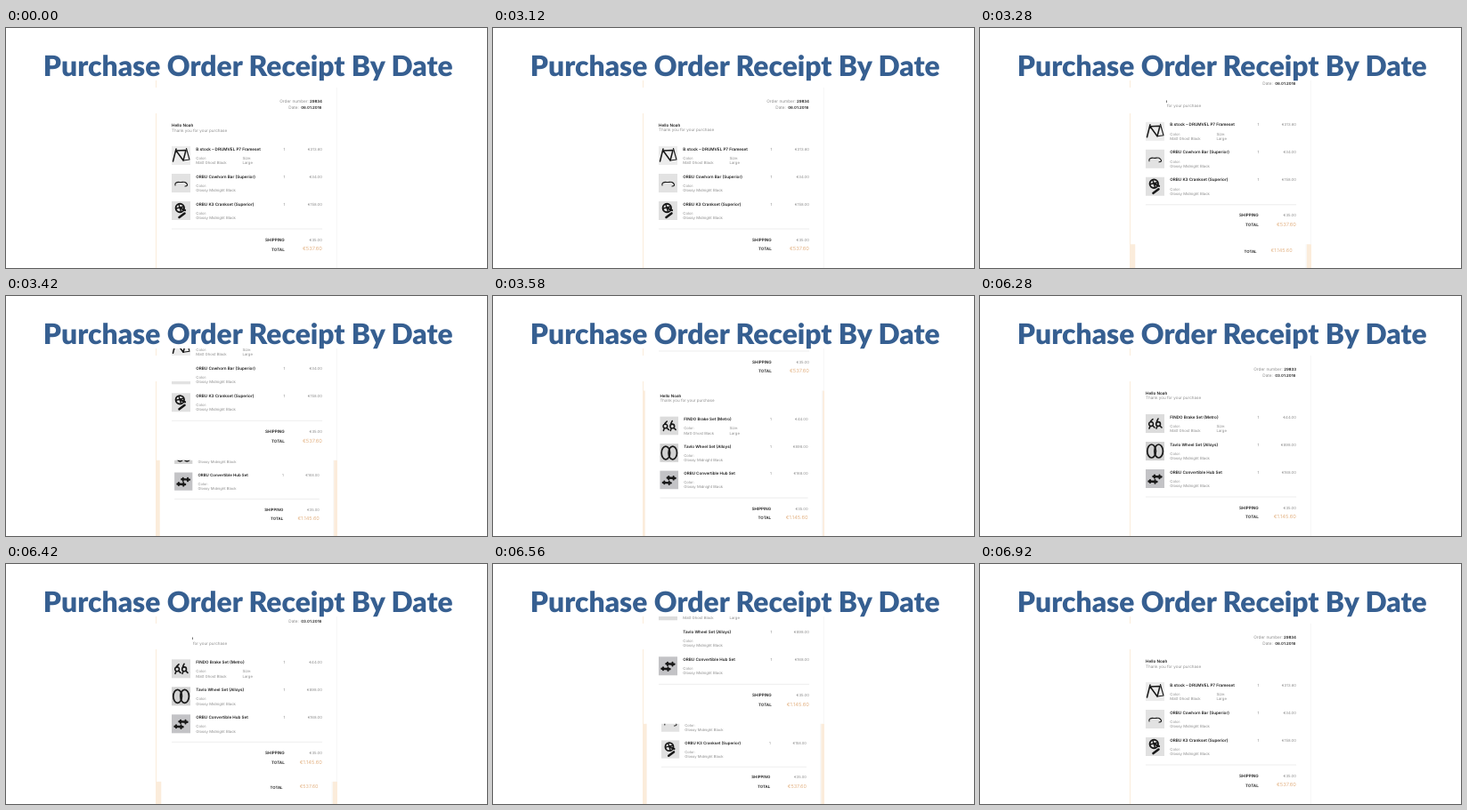
Animation, 540 px wide and 270 px high, one loop 7480 ms. Source, as an HTML page:

```html
<!DOCTYPE html>
<html lang="en">
<head>
<meta charset="utf-8">
<title>Purchase Order Receipt By Date</title>
<style>
  html, body { margin: 0; width: 100%; height: 100%; overflow: hidden; background: #fff; }
  svg { display: block; width: 540px; height: 270px; text-rendering: geometricPrecision; }
  .title { font: 900 31.8px Lato, sans-serif; fill: #365f91; text-anchor: middle; }
  .card text { font: 400 4.28px Inter, sans-serif; fill: #8c8c8c; }
  .card .bold { font-weight: 600; font-size: 4.6px; fill: #1c1c1c; }
  .card .digits { font-size: 4.35px; }
  .card .label { font-size: 4.75px; }
  .card .intro { font-size: 4.57px; }
  .card .sum { font-size: 5.75px; fill: #e3b385; }
  .end { text-anchor: end; }
  .line { fill: none; stroke: #181818; stroke-linecap: round; stroke-linejoin: round; }
</style>
</head>
<body>
<svg viewBox="0 0 540 270">
  <defs><clipPath id="window"><rect x="160" y="59" width="220" height="211"/></clipPath></defs>
  <g clip-path="url(#window)">
    <rect x="168" y="59" width="204" height="211" fill="#fbecdb"/>
    <g id="cards"></g>
    <rect x="160" y="67" width="49" height="29" fill="#fff"/>
  </g>
  <text class="title" x="271.8" y="54">Purchase Order Receipt By Date</text>
</svg>
<script>
const LOOP = 7480, TRAVEL = 230, SHRINK = 0.059, ORIGIN = [270, 290];

const stroke = (d, width) => `<path class="line" d="${d}" stroke-width="${width}"/>`;

// Product pictures, each drawn in a 21 x 21 box
const pictures = {
  frame: ['#ececec', stroke('M5 3L1.5 17M5 5L16 4.5L13 16Z', 1.5) + stroke('M16.5 2.5L20 15L13 16', 1.1)],
  bar: ['#e2e2e2', stroke('M4 13C3 10 6 9 9 9.5S14 8 16.5 10.5S17 14 15 14', 1.1)],
  crank: ['#e0e0e0',
    stroke('M14 7.5A4.7 4.7 0 1 1 4.6 7.5A4.7 4.7 0 1 1 14 7.5', 1.9) +
    stroke('M5 8L13 6M8 3.5L10.5 11.5', 1.4) + stroke('M9.5 7.5L15 10', 2.2) +
    stroke('M8.5 18L14.5 13.5', 2.6)],
  brakes: ['#dcdcdc',
    stroke('M8 5.5L5.5 8M8.5 11A2.4 2.4 0 1 1 3.7 11A2.4 2.4 0 1 1 8.5 11M5 13.5L4 16M8 13L10 15', 1.6) +
    stroke('M14 5L12.5 8M16.5 11A2.4 2.4 0 1 1 11.7 11A2.4 2.4 0 1 1 16.5 11M13 13.5L12 16M16 13L18 15', 1.6)],
  wheels: ['#d2d2d2',
    stroke('M1.8 10.5a4.8 7.5 0 1 0 9.6 0a4.8 7.5 0 1 0 -9.6 0', 1.7) +
    stroke('M9.8 10.5a4.8 7.5 0 1 0 9.6 0a4.8 7.5 0 1 0 -9.6 0', 1.7)],
  hubs: ['#c3c3c6',
    stroke('M8.5 8L17.5 8.5M3.5 13.5L12.5 14', 2.4) +
    stroke('M10 6.5V9.8M15.5 6.5V10.2M5 12V15M10.5 12V15.7', 2)],
};

const orders = [
  { number: '29834', date: '06.01.2016', sum: '€537.60', items: [
    ['frame', 'B.stock – DRUMVEL P7 Frameset', '€313.60'],
    ['bar', 'ORBU Cowhorn Bar (Superior)', '€34.00'],
    ['crank', 'ORBU K3 Crankset (Superior)', '€158.00'] ] },
  { number: '29833', date: '03.01.2016', sum: '€1.145.60', items: [
    ['brakes', 'FINDO Brake Set (Metro)', '€44.00'],
    ['wheels', 'Tavlo Wheel Set (Alloys)', '€898.00'],
    ['hubs', 'ORBU Convertible Hub Set', '€168.00'] ] },
];

const text = (x, y, content, style = '') =>
  `<text x="${x}" y="${y}" class="${style}">${content}</text>`;

function itemRow([picture, name, price], index) {
  const y = 133 + index * 31;
  const [tone, shape] = pictures[picture];
  const first = index === 0;
  return `<g transform="translate(186 ${y})"><rect width="21" height="21" fill="${tone}"/>${shape}</g>` +
    text(213.3, y + 4.7, name, 'bold') +
    text(213.3, y + 14.8, 'Color:') +
    text(213.3, y + 20.2, first ? 'Matt Ghost Black' : 'Glossy Midnight Black') +
    (first ? text(265.5, y + 14.8, 'Size:') + text(265.5, y + 20.2, 'Large') : '') +
    text(311.6, y + 4.7, '1') +
    text(355, y + 4.7, price, 'end');
}

function createCard(order) {
  const card = document.createElementNS('http://www.w3.org/2000/svg', 'g');
  card.setAttribute('class', 'card');
  card.innerHTML =
    '<rect x="169" y="40" width="203" height="230.5" fill="#fff"/>' +
    '<path d="M371.3 67V270.5" stroke="#f3f3f3" stroke-width=".7"/>' +
    text(340, 83.8, 'Order number:', 'label end') +
    text(355, 83.8, order.number, 'bold digits end') +
    text(329, 91.2, 'Date:', 'label end') +
    text(354.3, 91.2, order.date, 'bold digits end') +
    text(186, 111.1, 'Hello Noah', 'bold') +
    text(186, 116.5, 'Thank you for your purchase', 'intro') +
    order.items.map(itemRow).join('') +
    '<path d="M186 226H355" stroke="#e9e9e9" stroke-width=".8"/>' +
    text(312.8, 239.7, 'SHIPPING', 'bold end') +
    text(355, 239.7, '€35.00', 'end') +
    text(312.8, 250.5, 'TOTAL', 'bold end') +
    text(355, 250.3, order.sum, 'sum end');
  return card;
}

const layer = document.getElementById('cards');
const [early, late] = orders.map(createCard);
layer.append(late, early);

const slides = [
  { start: 3120, end: 3840, leaving: early, entering: late },
  { start: 6280, end: 6930, leaving: late, entering: early },
];

const ease = u => (1 - Math.cos(Math.PI * u)) / 2;

function place(front, back, progress) {
  if (layer.lastChild !== front) layer.append(front);
  const scale = 1 - SHRINK * (1 - progress);
  const [x, y] = ORIGIN;
  front.setAttribute('transform', `translate(0 ${-TRAVEL * progress})`);
  back.setAttribute('transform', `translate(${x} ${y}) scale(${scale}) translate(${-x} ${-y})`);
}

function draw(now) {
  const time = now % LOOP;
  const slide = slides.find(s => time < s.end);
  if (slide) {
    const u = Math.max(0, (time - slide.start) / (slide.end - slide.start));
    place(slide.leaving, slide.entering, ease(u));
  } else {
    place(early, late, 0);
  }
}

const origin = performance.now();
function tick() {
  draw(performance.now() - origin);
  requestAnimationFrame(tick);
}
tick();
</script>
</body>
</html>
```
